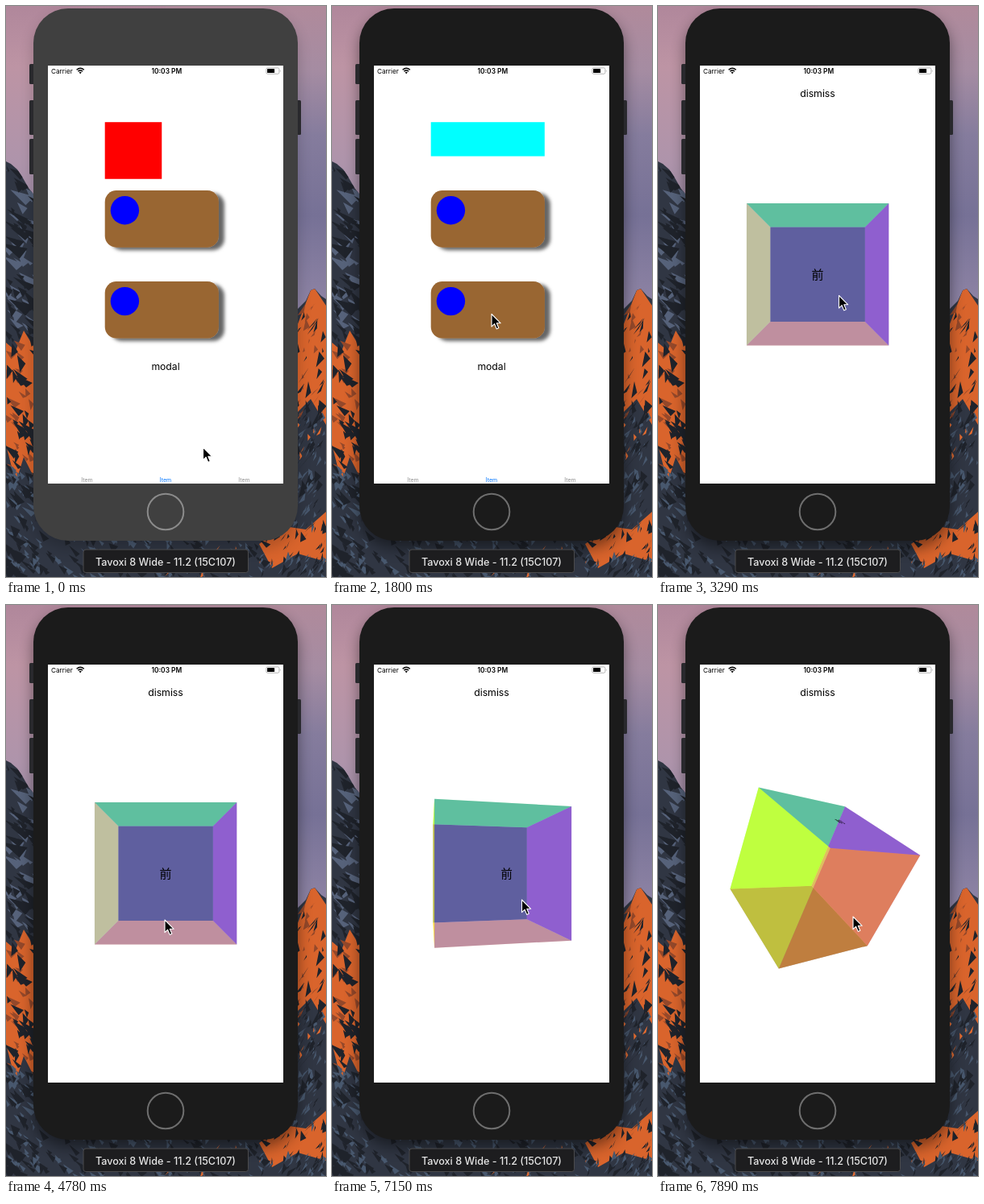
An HTML page that plays this animation: 397 px wide and 709 px high, repeating every 8000 ms.

```html
<!DOCTYPE html>
<html lang="en">
<head>
<meta charset="utf-8">
<title>Layer animation demo</title>
<style>
  html, body { margin: 0; width: 100%; height: 100%; overflow: hidden; background: #2b303c; }
  svg { display: block; width: 397px; height: 709px; }
  text { font-family: Inter, "Open Sans", sans-serif; text-anchor: middle; }
  .cjk { font-family: "Noto Sans CJK JP", "Noto Sans CJK SC", "Noto Sans CJK", sans-serif; }
</style>
</head>
<body>
<svg viewBox="0 0 397 709" xmlns="http://www.w3.org/2000/svg">
  <defs>
    <linearGradient id="skyL" x1="0" y1="0" x2="0" y2="1">
      <stop offset="0" stop-color="#b0879b"/>
      <stop offset=".25" stop-color="#bd94a4"/>
      <stop offset=".65" stop-color="#ae94ab"/>
      <stop offset="1" stop-color="#9788a4"/>
    </linearGradient>
    <linearGradient id="skyR" x1="0" y1="0" x2="0" y2="1">
      <stop offset="0" stop-color="#b08a9b"/>
      <stop offset=".2" stop-color="#a58ca2"/>
      <stop offset=".4" stop-color="#857c9d"/>
      <stop offset=".65" stop-color="#767196"/>
      <stop offset="1" stop-color="#9488a8"/>
    </linearGradient>
    <clipPath id="land">
      <path d="M0 193L6 196 14 203 20 212 28 226 36 236V709H0Z"/>
      <path d="M397 364L391 360 383 351 378 353 372 366 366 372 360 378V709H397Z"/>
      <path d="M30 640H366V709H30Z"/>
    </clipPath>
    <clipPath id="screen"><rect x="52" y="74" width="292" height="519"/></clipPath>
    <filter id="blur" x="-20%" y="-20%" width="140%" height="140%"><feGaussianBlur stdDeviation="9"/></filter>
    <filter id="drop" x="-20%" y="-20%" width="150%" height="150%">
      <feDropShadow dx="7" dy="3.5" stdDeviation="2" flood-color="#000" flood-opacity=".6"/>
    </filter>
    <g id="card">
      <rect x="122.7" width="141.2" height="70.6" rx="14.1" fill="#963" filter="url(#drop)"/>
      <circle cx="147.4" cy="24.6" r="17.7" fill="#00f"/>
    </g>
  </defs>

  <rect width="199" height="300" fill="url(#skyL)"/>
  <rect x="198" width="199" height="400" fill="url(#skyR)"/>
  <g clip-path="url(#land)">
    <rect y="180" width="397" height="529" fill="#303643"/>
    <g fill="#d9642c">
      <path d="M0 418L12 428 22 403 36 426V588L22 560 12 592 0 545Z"/>
      <path d="M397 372L383 351 378 353 360 400V506L378 488 397 520Z"/>
      <path d="M397 628L372 650 345 646 314 668 330 698 362 680 397 690Z"/>
    </g>
    <g id="rocks"></g>
  </g>

  <rect id="shade" x="34" y="12" width="328" height="661" rx="43" filter="url(#blur)"/>
  <g fill="#29292d">
    <rect x="29" y="72" width="8" height="25" rx="1.5"/>
    <rect x="29" y="117" width="8" height="43" rx="1.5"/>
    <rect x="29" y="165" width="8" height="44" rx="1.5"/>
    <rect x="358" y="117" width="8" height="43" rx="1.5"/>
  </g>
  <rect id="body" x="34" y="3" width="328" height="661" rx="43"/>
  <circle id="home" cx="198" cy="628" r="22.3" fill="none" stroke-width="2"/>

  <rect x="52" y="74" width="292" height="519" fill="#fff"/>
  <g clip-path="url(#screen)">
    <rect id="box" x="122.7" y="144.2"/>
    <use href="#card" y="229.1"/>
    <use href="#card" y="342"/>
    <text x="198" y="452" font-size="12.2">modal</text>
    <g font-size="7" fill="#929292">
      <text x="100.5" y="591">Item</text>
      <text x="198" y="591" fill="#0a7aff">Item</text>
      <text x="295.5" y="591">Item</text>
    </g>
    <g id="sheet">
      <rect x="52" y="74" width="292" height="522" fill="#fff"/>
      <text x="198" y="113" font-size="12.3">dismiss</text>
      <g id="cube"></g>
    </g>
    <text x="56" y="84" font-size="8.2" style="text-anchor:start">Carrier</text>
    <text x="199.3" y="84" font-size="8.4" font-weight="600">10:03 PM</text>
    <g fill="none" stroke="#000" stroke-width="1.5">
      <path d="M87.6 79.2Q92.2 75.2 96.8 79.2M89.4 81.2Q92.2 78.9 95 81.2"/>
    </g>
    <path d="M90.6 82.5Q92.2 81.2 93.8 82.5L92.2 84.2Z"/>
    <rect x="322.9" y="76.9" width="16" height="7.4" rx="1.6" fill="none" stroke="#999" stroke-width=".7"/>
    <rect x="324.1" y="78.1" width="9" height="5" rx=".6"/>
    <path d="M339.9 79.2Q341.4 80.6 339.9 82Z" fill="#999"/>
  </g>

  <rect x="96" y="675" width="204.5" height="28.5" rx="3" fill="#1d1d1f" stroke="#4b4b4d"/>
  <text x="198" y="694.6" font-size="12.6" font-weight="500" fill="#e6e6e6">Tavoxi 8 Wide - 11.2 (15C107)</text>

  <path id="cursor" d="M0 0V15.6L3.6 12.2 6.2 18.4 8.8 17.3 6.3 11.3H11.2Z"
        stroke="#fff" stroke-width="1.1" stroke-linejoin="round"/>
</svg>
<script>
const LOOP = 8000, TICK = 150;
const NS = 'http://www.w3.org/2000/svg';
const $ = id => document.getElementById(id);
const set = (el, attrs) => { for (const k in attrs) el.setAttribute(k, attrs[k]); return el; };
const add = (parent, tag, attrs) => set(parent.appendChild(document.createElementNS(NS, tag)), attrs);
const clamp = x => Math.max(0, Math.min(1, x));
const mix = (a, b, p) => a + (b - a) * p;

// Mountain texture: seeded long shards that lean along the slope
let seed = 11;
const rand = () => (seed = seed * 16807 % 2147483647) / 2147483647;

function shards(n, x, y, w, h, fill, size, lean) {
  let d = '';
  for (let i = 0; i < n; i++) {
    const s = size * (0.4 + rand());
    const at = [x + rand() * w, y + rand() * h];
    const tip = [s * (lean + rand() - 0.5), s];
    const side = [s * (0.2 + rand() * 0.4), -s * (0.2 + rand() * 0.5)];
    const [p, q, r] = [at, tip, side].map(v => v.map(c => c.toFixed(1)).join(' '));
    d += `M${p}l${q} ${r}z`;
  }
  add($('rocks'), 'path', { d, fill });
}
const slate = '#56627a', steel = '#48586e', dark = '#1f232b', orange = '#e36b30', rust = '#94482a';
shards(45, -6, 195, 40, 200, slate, 14, .7);
shards(45, -6, 195, 40, 220, dark, 15, .7);
shards(25, -6, 410, 40, 160, rust, 11, .5);
shards(32, -6, 405, 40, 190, dark, 16, .4);
shards(45, -6, 570, 40, 139, steel, 11, .5);
shards(45, -6, 570, 40, 139, dark, 14, .5);
shards(25, 356, 365, 40, 140, rust, 11, -.5);
shards(28, 356, 370, 40, 140, dark, 15, -.4);
shards(55, 356, 500, 40, 140, steel, 11, -.5);
shards(45, 356, 500, 40, 140, dark, 14, -.5);
shards(10, 356, 500, 40, 60, orange, 9, -.4);
shards(80, 30, 650, 290, 59, steel, 9, .5);
shards(80, 30, 650, 290, 59, dark, 11, .5);
shards(12, 200, 655, 120, 50, orange, 8, -.4);
shards(45, 312, 640, 85, 60, dark, 11, -.5);
shards(25, 312, 675, 85, 34, steel, 9, -.5);

const LATE = [15, 26, 37, 46, 48, 52];
const tickTime = k => TICK * k - 10 * LATE.filter(n => n <= k).length;
function held(t) {
  let k = 0;
  while (k < 53 && tickTime(k + 1) <= t) k++;
  return tickTime(k);
}

// Linear track of [time, a, b] points
function track(points, t) {
  let i = 0;
  while (i < points.length - 2 && points[i + 1][0] <= t) i++;
  const [t0, a0, b0] = points[i], [t1, a1, b1] = points[i + 1];
  const p = clamp((t - t0) / (t1 - t0));
  return [mix(a0, a1, p), mix(b0, b1, p)];
}
const MOUSE = [
  [0, 244.5, 548], [150, 254, 515], [300, 238, 320], [450, 218, 206], [750, 218, 206],
  [900, 213, 248.5], [1650, 200, 345], [1950, 196, 420], [2240, 194.5, 442.5], [2540, 194.5, 442.5],
  [3290, 224.5, 359.5], [3440, 233, 347], [3740, 173, 356], [3880, 178, 362], [4630, 178, 362],
  [4930, 216, 420], [5230, 186, 481], [5370, 186, 481], [5520, 210, 472], [5670, 231, 485.5],
  [5820, 231, 485.5], [5970, 225.5, 373.5], [6120, 225.5, 373.5], [6420, 219.5, 365.5],
  [6710, 219.5, 365.5], [7150, 235.5, 366], [7450, 251, 378], [7600, 254, 384], [7890, 242, 387]
];
// Cube turn about y and x, in radians
const TURN = [
  [6710, 0, 0], [7150, .212, 0], [7300, .45, .15], [7450, .7, .42],
  [7600, .88, .68], [7740, .9, .8], [7890, .712, .995]
];

const HALF = 70.55, EYE = HALF * 5, CX = 198.1, CY = 333.3;
// Each face: normal, right and down axes, colour, opacity
const FACES = [
  { n: [0, 0, -1], u: [-1, 0, 0], v: [0, 1, 0], fill: '#000', a: .5 },
  { n: [0, -1, 0], u: [1, 0, 0], v: [0, 0, 1], fill: '#0f0', a: .5 },
  { n: [0, 1, 0], u: [1, 0, 0], v: [0, 0, -1], fill: '#ff7f00', a: .5 },
  { n: [-1, 0, 0], u: [0, 0, 1], v: [0, 1, 0], fill: '#ff0', a: .5 },
  { n: [1, 0, 0], u: [0, 0, -1], v: [0, 1, 0], fill: '#7f007f', a: .5 },
  { n: [0, 0, 1], u: [1, 0, 0], v: [0, 1, 0], fill: '#00f', a: .25, label: '前' }
];
for (const f of FACES) {
  f.el = add($('cube'), 'g', {});
  f.shape = add(f.el, 'polygon', { fill: f.fill, 'fill-opacity': f.a });
  if (f.label) {
    f.text = add(f.el, 'text', { class: 'cjk', y: 4.5, 'font-size': 12 });
    f.text.textContent = f.label;
  }
}

function project([x, y, z], yaw, pitch) {
  const y1 = y * Math.cos(pitch) - z * Math.sin(pitch);
  const z1 = y * Math.sin(pitch) + z * Math.cos(pitch);
  const x2 = x * Math.cos(yaw) + z1 * Math.sin(yaw);
  const z2 = z1 * Math.cos(yaw) - x * Math.sin(yaw);
  const s = HALF / (1 - z2 * HALF / EYE);
  return [CX + x2 * s, CY + y1 * s];
}

function drawCube(yaw, pitch) {
  for (const f of FACES) {
    const at = (a, b) => project(f.n.map((c, i) => c + a * f.u[i] + b * f.v[i]), yaw, pitch);
    const q = [at(-1, -1), at(1, -1), at(1, 1), at(-1, 1)];
    set(f.shape, { points: q.map(p => p.map(c => c.toFixed(2))).join(' ') });
    f.facing = (q[2][0] - q[0][0]) * (q[3][1] - q[1][1]) - (q[2][1] - q[0][1]) * (q[3][0] - q[1][0]) > 0;
    if (f.text) {
      const e = .1, o = at(0, 0), r = at(e, 0), d = at(0, e), k = e * HALF;
      const m = [r[0] - o[0], r[1] - o[1], d[0] - o[0], d[1] - o[1]].map(c => c / k);
      set(f.text, { transform: `matrix(${[...m, ...o].join(' ')})` });
    }
  }
  // Faces turned away are painted first
  for (const side of [false, true])
    for (const f of FACES) if (f.facing === side) $('cube').appendChild(f.el);
}

function render(time) {
  const t = held(time % LOOP);

  const active = t >= 750;
  set($('body'), { fill: active ? '#1b1b1b' : '#404040' });
  set($('home'), { stroke: active ? '#6e6e6e' : '#8b8b8b' });
  set($('shade'), { opacity: active ? .45 : .2 });

  const x = clamp((t - 809) / 250), p = x * x * (3 - 2 * x);
  const c = Math.round(255 * p);
  set($('box'), {
    width: HALF * (1 + p), height: HALF * (1 - .4 * p), fill: `rgb(${255 - c},${c},${c})`
  });

  // Critically damped rise of the sheet
  const s = Math.max(0, t - 2419.5) * .018;
  set($('sheet'), { transform: `translate(0 ${(520 * (1 + s) * Math.exp(-s)).toFixed(2)})` });

  drawCube(...track(TURN, t));
  set($('cursor'), { transform: `translate(${track(MOUSE, t).join(' ')})` });
}

const start = performance.now();
function loop() {
  render(performance.now() - start);
  requestAnimationFrame(loop);
}
render(0);
requestAnimationFrame(loop);
</script>
</body>
</html>
```
